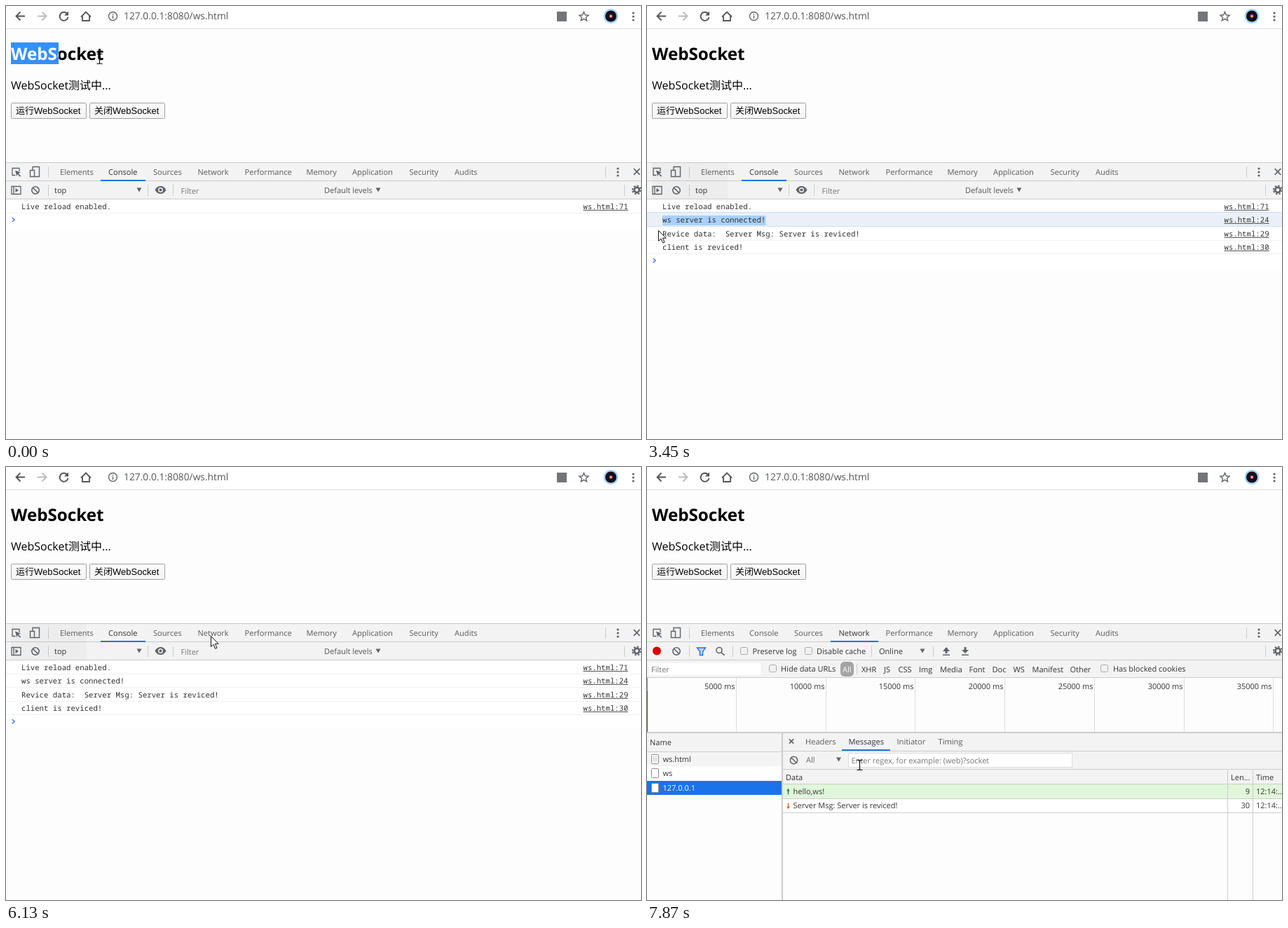
Animation, 906 px wide and 618 px high, one loop 8 s. Source, as an HTML page with a canvas:

```html
<!DOCTYPE html>
<html lang="zh">
<head>
<meta charset="utf-8">
<title>WebSocket</title>
<style>
html, body { margin: 0; width: 100%; height: 100%; overflow: hidden; background: #fdfdfd; }
canvas { display: block; }
</style>
</head>
<body>
<canvas id="stage" width="906" height="618"></canvas>
<script>
const ctx = document.getElementById('stage').getContext('2d');
ctx.textRendering = 'geometricPrecision';
const SANS = '"Open Sans", "Noto Sans CJK SC", "Noto Sans CJK", sans-serif';
const UI = '11px ' + SANS, TAB = '11.1px ' + SANS;
const MONO = '10.68px "Noto Sans Mono", monospace';
const BUTTON = '13px "Liberation Sans", "Noto Sans CJK SC", "Noto Sans CJK", sans-serif';
const INK = '#333', GREY = '#5f6368', LINE = '#ccc', BAR = '#f3f3f3', BLUE = '#1a73e8', BG = '#fdfdfd';
const LOOP = 8000, ROW = 19.45;

// Screen updates come in bursts: first time, last time, count.
const bursts = [[0, 0, 1], [120, 1120, 8], [1250, 1550, 3], [1990, 2990, 8], [3140, 4050, 7],
  [4200, 4630, 4], [4930, 5060, 2], [5360, 6280, 7], [6430, 6430, 1], [6710, 7740, 8], [7870, 7870, 1]];

// Pointer stops: time, x, y.
const stops = [[0, 133, 75], [263, 171, 77], [550, 150, 84], [1120, 72, 128], [1250, 62, 152], [1550, 58, 150],
  [1990, 58, 150], [2420, 40, 225], [2700, 22, 302], [2990, 172, 304], [3450, 14, 320], [3600, 22, 321],
  [4050, 324, 325], [4340, 150, 339], [4630, 25, 342], [4930, 120, 348], [5060, 168, 350], [5360, 170, 351],
  [5960, 292, 241], [6430, 292, 241], [6710, 124, 392], [7010, 45, 456], [7150, 48, 456],
  [7590, 290, 405], [7740, 302, 424], [7870, 303, 425]];

const logs = [['Live reload enabled.', 71], ['ws server is connected!', 24],
  ['Revice data:  Server Msg: Server is reviced!', 29], ['client is reviced!', 30]];

function lastUpdate(t) {
  const [from, to, count] = bursts.filter(b => b[0] <= t).pop();
  if (count === 1) return from;
  const step = (to - from) / (count - 1);
  return from + step * Math.min(count - 1, Math.floor((t - from) / step + 0.01));
}

function pointerAt(t) {
  const i = stops.findIndex(s => s[0] > t);
  if (i < 0) return stops[stops.length - 1].slice(1);
  const [t0, x0, y0] = stops[i - 1], [t1, x1, y1] = stops[i], k = (t - t0) / (t1 - t0);
  return [Math.round(x0 + (x1 - x0) * k), Math.round(y0 + (y1 - y0) * k)];
}

function rect(x, y, w, h, color) {
  ctx.fillStyle = color;
  ctx.fillRect(x, y, w, h);
}

function box(x, y, w, h, fill, stroke, radius = 0) {
  ctx.beginPath();
  ctx.roundRect(x + .5, y + .5, w - 1, h - 1, radius);
  ctx.fillStyle = fill;
  ctx.fill();
  ctx.lineWidth = 1;
  ctx.strokeStyle = stroke;
  ctx.stroke();
}

function text(str, x, y, color = INK, font = UI, align = 'left') {
  ctx.font = font;
  ctx.textAlign = align;
  ctx.fillStyle = color;
  ctx.fillText(str, x, y);
}

function link(str, x, y, font = UI) {
  text(str, x, y, INK, font);
  rect(x, y + 1, ctx.measureText(str).width, 1, '#555');
}

function disc(x, y, r, color) {
  ctx.beginPath();
  ctx.arc(x, y, r, 0, 7);
  ctx.fillStyle = color;
  ctx.fill();
}

function icon(d, x, y, stroke, width = 1.5, fill) {
  const path = new Path2D(d);
  ctx.save();
  ctx.translate(x, y);
  if (fill) { ctx.fillStyle = fill; ctx.fill(path); }
  if (stroke) { ctx.strokeStyle = stroke; ctx.lineWidth = width; ctx.stroke(path); }
  ctx.restore();
}

const CIRCLE = r => `M${-r} 0a${r} ${r} 0 1 1 ${2 * r} 0a${r} ${r} 0 1 1 ${-2 * r} 0`;
const vline = (x, y = 255, h = 16, color = LINE) => rect(x, y, 1, h, color);
const hline = (y, x = 0, w = 906, color = LINE) => rect(x, y, w, 1, color);
const triangle = (x, y) => icon('M-3.5-3H3.5L0 3Z', x, y, null, 0, GREY);
const blocked = (x, y) => icon(CIRCLE(5.2) + 'M-3.7-3.7L3.7 3.7', x, y, GREY, 1.6);
const checkbox = (x, y) => box(x, y, 11, 11, '#f2f2f2', '#aaa', 2);
const kebab = (x, y) => [-5, 0, 5].forEach(d => disc(x, y + d, 1.6, GREY));
const cross = (x, y, r) => icon(`M${-r}${-r}L${r} ${r}M${r}${-r}L${-r} ${r}`, x, y, GREY, 1.7);

function drawBrowserBar() {
  rect(0, 0, 906, 32, '#fff');
  hline(32, 0, 906, '#ddd');
  icon('M6.5 0H-5.5M0-6L-6 0L0 6', 20.5, 14.5, '#555', 1.8);
  icon('M-6.5 0H5.5M0-6L6 0L0 6', 51.5, 14.5, '#bbb', 1.8);
  icon('M4.5-3.8A6 6 0 1 0 6 1.5', 82.5, 14.5, '#555', 1.9);
  icon('M6.5-7V-1H.5Z', 82.5, 14.5, null, 0, '#555');
  icon('M-7 1L0-6L7 1M-5 0V6.5H5V0', 114, 14.5, '#555', 1.8);
  icon(CIRCLE(6) + 'M0-1V3.5M0-3.6V-2', 152.5, 14.5, GREY, 1.4);
  text('127.0.0.1:8080/ws.html', 168, 19, '#555', '13.8px ' + SANS);
  rect(786, 8, 14, 14, '#737579');
  icon('M0-6.5L1.9-2.2L6.5-1.8L3 1.2L4.1 5.8L0 3.4L-4.1 5.8L-3 1.2L-6.5-1.8L-1.9-2.2Z', 824.5, 15, GREY, 1.4);
  disc(863, 14.5, 10.5, '#a3d2f6');
  disc(863, 14.5, 8, '#12101c');
  disc(863, 14.5, 2.4, '#e0505c');
  disc(863, 14.5, 1, '#fff');
  kebab(895, 15);
}

function drawButton(label, x, hover) {
  const shade = ctx.createLinearGradient(0, 138, 0, 161);
  shade.addColorStop(0, '#fbfbfb');
  shade.addColorStop(1, hover ? '#e4e4e4' : '#f4f4f4');
  box(x, 138, 108, 23, shade, hover ? '#777' : '#a0a0a0', 1);
  text(label, x + 7, 154, '#000', BUTTON);
}

function drawPage(now) {
  const title = color => text('WebSocket', 7, 77, color, 'bold 24.2px ' + SANS);
  title('#000');
  const selected = now < 120 ? 68 : now < 700 ? 133 : 0;
  if (selected) {
    ctx.save();
    ctx.beginPath();
    ctx.rect(7, 52, selected, 31);
    ctx.clip();
    rect(7, 52, selected, 31, '#3390ff');
    title('#fff');
    ctx.restore();
  }
  text('WebSocket测试中...', 7, 119, '#000', '16px ' + SANS);
  drawButton('运行WebSocket', 7, now >= 1250 && now < 2200);
  drawButton('关闭WebSocket', 119, false);
}

function drawTabs(now) {
  rect(0, 223, 906, 53, BAR);
  [223, 249, 275].forEach(y => hline(y));
  icon('M4-1V-5.5H-6V4.5H-1.5', 15, 237, GREY, 1.3);
  icon('M-2-2L6 1.2L2.7 2.4L6.2 6L5 7.2L1.5 3.6L.5 6.8Z', 15, 236.5, null, 0, GREY);
  icon('M-3-2V-7H6.5V7H0M-6.5-2H-.5V7H-6.5Z', 41, 236.5, GREY, 1.4);
  vline(60, 229);
  const active = now < 6280 ? 'Console' : 'Network';
  [['Elements', 77], ['Console', 146], ['Sources', 210], ['Network', 273.5], ['Performance', 340.5], ['Memory', 428.5],
    ['Application', 494], ['Security', 575.5], ['Audits', 640]]
    .forEach(([name, x]) => text(name, x, 241, name === active ? INK : '#5a5a5a', TAB));
  now < 6430 ? rect(135, 248, 64, 2, BLUE) : rect(262, 248, 68, 2, BLUE);
  vline(855, 229);
  kebab(873, 237);
  cross(900, 236.5, 4.3);
  vline(882);
  icon(CIRCLE(3.6), 900, 262.5, GREY, 2.6);
  ctx.setLineDash([2.4, 2.31]);
  icon(CIRCLE(6), 900, 262.5, GREY, 2);
  ctx.setLineDash([]);
  blocked(42, 263);
  vline(60);
}

function drawConsole(now, x) {
  icon('M-6.5-5.5H6.5V5.5H-6.5ZM-3.5-5.5V5.5', 14.5, 263, GREY, 1.3);
  icon('M-1-3L3.5 0L-1 3Z', 14.5, 263, null, 0, GREY);
  text('top', 69, 267);
  triangle(190, 262.5);
  vline(202);
  icon('M-8 0Q-5-5.5 0-5.5T8 0Q5 5.5 0 5.5T-8 0Z', 220.5, 262.5, null, 0, GREY);
  disc(220.5, 262.5, 3.5, BAR);
  disc(220.5, 262.5, 2.1, GREY);
  vline(238);
  text('Filter', 249.5, 268, '#777');
  text('Default levels', 454, 267, '#555');
  triangle(531, 262.5);
  if (now >= 2400) rect(7, 224, 108, 51, 'rgba(0,0,0,.022)');

  const count = now < 1990 ? 1 : 4;
  const hover = now < 2700 ? -1 : now < 3590 ? 1 : now < 4930 ? 2 : now < 5500 ? 3 : -1;
  const chosen = now < 2700 || now >= 4930 ? -1 : now < 3590 ? 1 : 2;
  const dragging = now < 2990 || (now >= 3590 && now < 4050);
  rect(0, 276, 906, count * ROW + ROW, '#fff');
  for (let i = 0; i < count; i++) {
    const top = Math.round(276 + i * ROW), baseline = Math.round(289.9 + i * ROW), [message, line] = logs[i];
    if (i === hover) {
      rect(0, top, 906, 19, '#ebf0f8');
      hline(top - 1, 0, 906, '#cfdff2');
    }
    if (i === chosen) {
      const chars = dragging ? Math.max(0, Math.round((x - 22) / 6.41)) : message.length;
      rect(22, top + 4, Math.min(chars, message.length) * 6.41, 14, '#a9d1fb');
    }
    hline(top + 19, 0, 906, i === hover ? '#cfdff2' : '#f0f0f0');
    text(message, 22, baseline, '#303030', MONO);
    link('ws.html:' + line, 823.5, baseline, MONO);
  }
  icon('M-1.7-3L1.7 0L-1.7 3', 10.5, 276 + count * ROW + 9.5, '#367cf1', 1.4);
}

function drawNetworkBars() {
  disc(14, 262.5, 6, '#d80000');
  icon('M-6-5.5H6L2 0V5H-2V0Z', 77.5, 263.5, BLUE, 1.4, '#bcd4f8');
  icon(CIRCLE(4) + 'M3 3L7.5 7.5', 103, 261.5, GREY, 1.6);
  [122, 320, 408].forEach(x => vline(x));
  checkbox(133, 257);
  text('Preserve log', 150.5, 267);
  checkbox(225, 257);
  text('Disable cache', 242, 267);
  text('Online', 331, 267);
  triangle(393, 262.5);
  icon('M0-6L5 0H1.5V3H-1.5V0H-5ZM-5 4.5H5V6H-5Z', 427, 263, null, 0, GREY);
  icon('M0 3L5-2H1.5V-6H-1.5V-2H-5ZM-5 4.5H5V6H-5Z', 454, 263, null, 0, GREY);

  rect(0, 276, 906, 24, BAR);
  rect(3, 280, 159, 17, '#fff');
  text('Filter', 6, 293, '#777');
  checkbox(174, 282);
  text('Hide data URLs', 191, 292);
  box(276, 278, 19, 21, '#a3a3a3', '#a3a3a3', 5);
  text('All', 279, 293, '#fff');
  vline(299, 281, 15);
  [['XHR', 306], ['JS', 338], ['CSS', 358.5], ['Img', 388], ['Media', 418], ['Font', 459.5], ['Doc', 492.5],
    ['WS', 522.5], ['Manifest', 549.5], ['Other', 603.5]].forEach(([name, x]) => text(name, x, 293));
  checkbox(647, 282);
  text('Has blocked cookies', 665, 292);

  hline(300);
  for (let i = 1; i <= 7; i++) {
    const x = Math.round(127.75 * i - 1);
    vline(x, 301, 77, '#ddd');
    text(i * 5000 + ' ms', x - 1.5, 317, INK, UI, 'right');
  }
  vline(0, 301, 19, '#888');
  vline(0, 320, 58, '#c5221f');
  rect(0, 378, 906, 2, LINE);
}

function drawRequestNames(width, selected) {
  rect(0, 380, width, 26, BAR);
  text('Name', 4, 397);
  hline(406, 0, width);
  ['ws.html', 'ws', '127.0.0.1'].forEach((name, i) => {
    const y = 407 + Math.round(i * 20.3), active = i === selected;
    rect(0, y, width, 20, active ? BLUE : i % 2 ? '#fff' : '#f4f4f4');
    box(6, y + 3, 11, 14, '#fff', '#8a8a8a', 1);
    if (i === 0) [6, 8, 10, 12].forEach(d => hline(y + d, 8, 7, '#ccc'));
    text(name, 22.5, y + 14, active ? '#fff' : INK);
  });
}

function drawRequestTable() {
  drawRequestNames(906, -1);
  [['Status', 272], ['Type', 352.5], ['Initiator', 432], ['Size', 566], ['Time', 645], ['Waterfall', 725]]
    .forEach(([name, x]) => text(name, x, 397));
  icon('M-4 3H4L0-3Z', 901, 392.5, null, 0, GREY);
  [[304, 'document', 'Other', '219 B', '4 ms'], [101, 'websocket', 'ws.html:66', '0 B', 'Pending'],
    [101, 'websocket', 'ws.html:22', '0 B', 'Pending']].forEach(([status, type, source, size, time], i) => {
    const y = 421 + Math.round(i * 20.3);
    text(status, 272, y);
    text(type, 352.5, y);
    i ? link(source, 432, y) : text(source, 432, y, '#808080');
    text(size, 636.5, y, INK, UI, 'right');
    text(time, 716.5, y, i ? '#808080' : INK, UI, 'right');
  });
  [267, 348, 428, 561, 641, 720].forEach(x => vline(x, 380, 238, '#d5d5d5'));
  vline(844, 407, 211, '#e4e4e4');
  rect(725, 407, 2, 211, '#3f5ba9');
}

function drawMessages() {
  drawRequestNames(192, 2);
  rect(192, 380, 2, 238, LINE);
  rect(194, 380, 712, 72, BAR);
  cross(206, 391.5, 3.2);
  [['Headers', 226], ['Messages', 287.5], ['Initiator', 356.5], ['Timing', 415.5]]
    .forEach(([name, x]) => text(name, x, 396, name === 'Messages' ? INK : '#5a5a5a', TAB));
  hline(405, 194);
  rect(278, 403, 69, 2, BLUE);
  blocked(209.5, 418.5);
  text('All', 227, 422, '#666');
  triangle(273.5, 417.5);
  box(287, 408, 320, 21, '#fff', '#ddd');
  text('Enter regex, for example: (web)?socket', 291.5, 423, '#777');
  hline(431, 194);
  [['Data', 198], ['Len...', 833], ['Time', 869]].forEach(([name, x]) => text(name, x, 447));
  hline(452, 194);
  rect(194, 453, 712, 20, '#e1f6db');
  rect(194, 474, 712, 19, '#fff');
  hline(473, 194);
  hline(493, 194);
  [['hello,ws!', 9], ['Server Msg: Server is reviced!', 30]].forEach(([data, length], i) => {
    const y = 467 + i * 20;
    icon(i ? 'M0-4V3M-1.5 1L0 3.5L1.5 1' : 'M0 4V-3M-1.5-1L0-3.5L1.5-1', 201.5, y - 3.5, i ? '#e8590c' : '#188038', 1.3);
    text(data, 208.5, y);
    text(length, 860, y, INK, UI, 'right');
    text('12:14:...', 869, y);
  });
  vline(828, 432, 186);
  vline(864, 432, 186);
}

function drawTooltip() {
  ctx.save();
  ctx.shadowColor = 'rgba(0,0,0,.3)';
  ctx.shadowBlur = 4;
  ctx.shadowOffsetY = 1;
  box(261, 298, 155, 24, 'rgba(247,247,247,.9)', '#c4c4c4', 2);
  ctx.restore();
  text('Hides data: and blob: URLs', 269, 314, '#666');
}

function drawPointer(now, x, y) {
  const overText = now < 1250 || (now >= 6710 && now < 6800) || now >= 7735;
  if (overText) icon('M-4-7H-1L0-6L1-7H4M0-6V6M-4 7H-1L0 6L1 7H4', x + .5, y + .5, '#111', 1.2);
  else icon('M.5.5V15.5L4 12.2L6.6 18.2L9 17.2L6.4 11.3H11.2Z', x, y, '#111', 1, '#fff');
}

function draw() {
  const now = lastUpdate(performance.now() % LOOP);
  const [x, y] = pointerAt(now);
  rect(0, 0, 906, 618, BG);
  drawBrowserBar();
  drawPage(now);
  drawTabs(now);
  if (now < 6280) drawConsole(now, x);
  else {
    drawNetworkBars();
    now < 7150 ? drawRequestTable() : drawMessages();
    if (now >= 6710 && now < 6850) drawTooltip();
  }
  drawPointer(now, x, y);
  requestAnimationFrame(draw);
}
draw();
</script>
</body>
</html>
```
